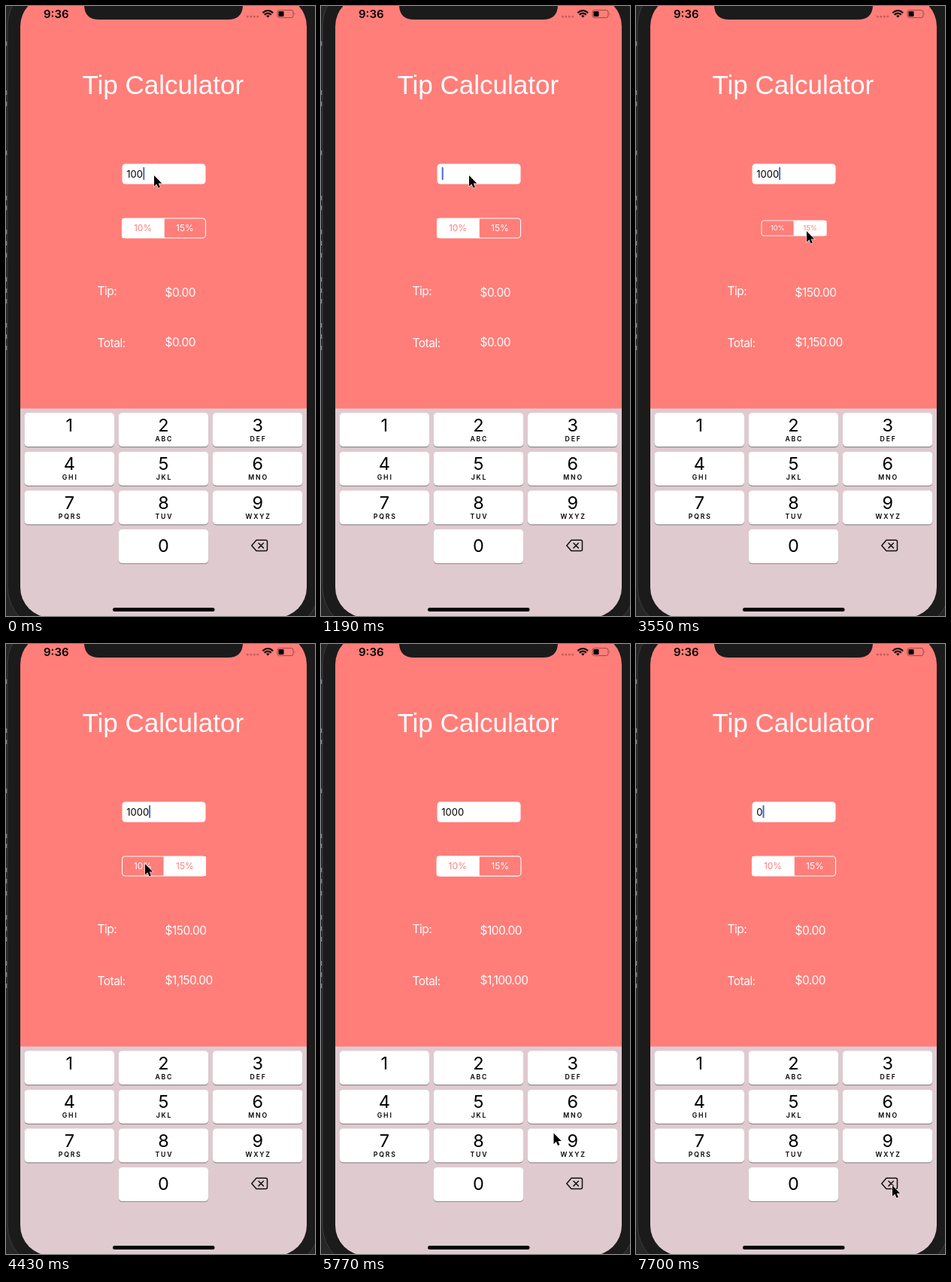
Recreate the animation shown at these times as an HTML page. Size 411 px wide and 810 px high, loop 8 s.

```html
<!DOCTYPE html>
<html lang="en">
<head>
<meta charset="utf-8">
<title>Tip Calculator</title>
<style>
  html, body { margin: 0; width: 100%; height: 100%; overflow: hidden; background: #252628; }
  svg { display: block; width: 411px; height: 810px; font-family: Inter, Roboto, sans-serif; }
  .title { font: 35px "Liberation Sans", sans-serif; fill: #fff; }
  .label { font-size: 15.5px; letter-spacing: -.5px; fill: #fff; }
  .clock { font-size: 15px; font-weight: 600; }
  .entry { font-size: 13px; }
  .segment { font-size: 12px; text-anchor: middle; }
  .digit { font-size: 23.5px; text-anchor: middle; }
  .letters { font-size: 8.7px; font-weight: 600; letter-spacing: 1.8px; text-anchor: middle; }
</style>
</head>
<body>
<svg viewBox="0 0 411 810">
  <defs>
    <clipPath id="screen"><rect x="19" y="-13" width="381" height="825" rx="40"/></clipPath>
  </defs>
  <g id="behind" fill="#85868a"></g>
  <rect x="2" y="-31" width="415" height="860" rx="57" fill="#1b1b1b" stroke="#3d3d3e"/>

  <g clip-path="url(#screen)">
    <rect x="19" y="-13" width="381" height="548" fill="#ff7e79"/>
    <rect x="19" y="534.5" width="381" height="278" fill="#dfcad0"/>
    <g id="keys"></g>
    <g fill="none" stroke="#111" stroke-width="1.5" stroke-linejoin="round" stroke-linecap="round">
      <path d="M333 709.3H345.5Q347.5 709.3 347.5 711.3V721.5Q347.5 723.5 345.5 723.5H333L326.8 716.4Z"/>
      <path d="M336 713.2l6.4 6.4m0-6.4l-6.4 6.4"/>
    </g>
    <rect x="142" y="799" width="135.5" height="5" rx="2.5"/>
  </g>
  <path d="M98-4Q104-4 104 0Q105 18 124 18H295Q314 18 315 0Q315-4 321-4Z" fill="#1b1b1b"/>

  <text class="clock" x="50" y="15.5">9:36</text>
  <g fill="#000" fill-opacity=".25">
    <circle cx="321.3" cy="14" r="1.5"/><circle cx="325.8" cy="14" r="1.5"/>
    <circle cx="330.3" cy="14" r="1.5"/><circle cx="334.8" cy="14" r="1.5"/>
  </g>
  <g fill="none" stroke="#000" stroke-width="2.1">
    <path d="M341.4 9.1Q348.3 2.9 355.2 9.1M343.8 11.6Q348.3 7.6 352.8 11.6"/>
    <path d="M346 13.1Q348.3 11.2 350.6 13.1L348.3 15.6Z" fill="#000" stroke="none"/>
  </g>
  <rect x="361" y="5.5" width="21" height="10" rx="2.5" fill="none" stroke="#000" stroke-opacity=".4"/>
  <path d="M383.5 8.8q1.7 1.7 0 3.4z" fill-opacity=".4"/>
  <rect x="362.5" y="7" width="7" height="7" rx="1.2"/>

  <text class="title" x="101.5" y="116.5">Tip Calculator</text>

  <rect x="154.5" y="209.5" width="111" height="27" rx="4.5" fill="#fff"/>
  <text id="entry" class="entry" x="160.3" y="227.5"></text>
  <rect id="caret" y="214" width="2" height="17" rx=".8" fill="#4468dc"/>

  <g id="control">
    <rect id="picked" y="282" width="56" height="26" fill="#fff"/>
    <rect x="154.5" y="282" width="111" height="26" rx="4" fill="none" stroke="#fff" stroke-width="1.1"/>
    <path d="M210 282V308" stroke="#fff"/>
    <text id="low" class="segment" x="182" y="299.4">10%</text>
    <text id="high" class="segment" x="238" y="299.4">15%</text>
  </g>

  <text class="label" x="121.5" y="383.5">Tip:</text>
  <text class="label" x="121.5" y="452.5">Total:</text>
  <text id="tip" class="label" x="211.5" y="385.5"></text>
  <text id="total" class="label" x="211.5" y="451.7"></text>

  <path id="pointer" d="M0 0V14.4L3.3 11.3L5.6 16.5L7.9 15.5L5.7 10.4H10.3Z" stroke="#fff" stroke-width="1.1" paint-order="stroke"/>
</svg>
<script>
const LOOP = 8000, TICK = 148;
const SALMON = "#ff7e79";
const $ = id => document.getElementById(id);

// All times below are counted in ticks.
const typed = [[0, "100"], [2, "10"], [5, "1"], [8, ""], [12, "1"], [13, "10"], [14, "100"],
  [15, "1000"], [42, "100"], [44, "10"], [46, "1"], [48, ""], [52, "0"]];
const caretOff = [[19, 22], [26, 29], [33, 36], [39, 42], [51, 52]];
const taps = [[23, 0.45], [33, 0.52]];
const path = [[17, 197, 225], [18, 221, 267], [20, 229, 290], [22, 227, 299], [26, 227, 299],
  [29, 196, 294], [31, 174, 290], [36, 174, 290], [38, 262, 540], [40, 357, 759],
  [41, 342, 721], [42, 341, 719]];

function buildKeys() {
  const letters = ["", "ABC", "DEF", "GHI", "JKL", "MNO", "PQRS", "TUV", "WXYZ"];
  const key = (digit, col, row, sub) => {
    const x = 24.5 + col * 125.2, y = 540.3 + row * 51.6, mid = x + 59.8;
    return `<rect x="${x}" y="${y + 1}" width="119.5" height="45" rx="4.8" fill="#918a8e"/>
      <rect x="${x}" y="${y}" width="119.5" height="44.8" rx="4.8" fill="#fff"/>
      <text class="digit" x="${mid}" y="${y + (digit ? 24.2 : 29.5)}">${digit}</text>
      <text class="letters" x="${mid + 0.9}" y="${y + 37.2}">${sub}</text>`;
  };
  $("keys").innerHTML = letters.map((s, i) => key(i + 1, i % 3, Math.floor(i / 3), s)).join("") +
    key(0, 1, 3, "");
}

function buildBehind() {
  const rows = [50, 115, 130, 195, 255, 268, 300, 315, 331, 363, 378, 392, 424, 439, 454];
  $("behind").innerHTML = rows.map(y => `<rect y="${y - 3}" width="1.3" height="6"/>`).join("");
}

const latest = (table, k) => table.filter(row => row[0] <= k).pop();
const money = n => "$" + n.toLocaleString("en-US", { minimumFractionDigits: 2, maximumFractionDigits: 2 });

function pointerAt(k) {
  const i = path.findIndex(p => p[0] > k);
  if (i === 0) return path[0].slice(1);
  if (i < 0) return path[path.length - 1].slice(1);
  const [a, x0, y0] = path[i - 1], [b, x1, y1] = path[i];
  const u = (k - a) / (b - a);
  return [x0 + (x1 - x0) * u, y0 + (y1 - y0) * u];
}

// Damped bounce after each tap on the segmented control.
function bounce(k) {
  const tap = latest(taps, k);
  if (!tap) return 1;
  const d = k - tap[0];
  return d > 6 ? 1 : 1 + tap[1] * 0.5 ** d * Math.cos(Math.PI * d);
}

function draw(ms) {
  const k = Math.floor((ms + 10) / TICK);
  const text = latest(typed, k)[1];
  const high = k >= taps[0][0] && k < taps[1][0];
  const bill = k < typed[1][0] ? 0 : Number(text);
  const tip = bill * (high ? 0.15 : 0.1);

  $("entry").textContent = text;
  $("tip").textContent = money(tip);
  $("total").textContent = money(bill + tip);

  let caretX = 160.7;
  for (const c of text) caretX += c === "1" ? 6 : 7.8;
  $("caret").setAttribute("x", caretX);
  $("caret").style.opacity = caretOff.some(([a, b]) => k >= a && k < b) ? 0 : 1;

  $("picked").setAttribute("x", high ? 210 : 154.5);
  $("low").setAttribute("fill", high ? "#fff" : SALMON);
  $("high").setAttribute("fill", high ? SALMON : "#fff");
  $("control").setAttribute("transform", `translate(210 295) scale(${bounce(k)}) translate(-210 -295)`);
  $("pointer").setAttribute("transform", `translate(${pointerAt(k)})`);
}

buildKeys();
buildBehind();
const start = performance.now();
function loop() {
  draw((performance.now() - start) % LOOP);
  requestAnimationFrame(loop);
}
loop();
</script>
</body>
</html>
```
